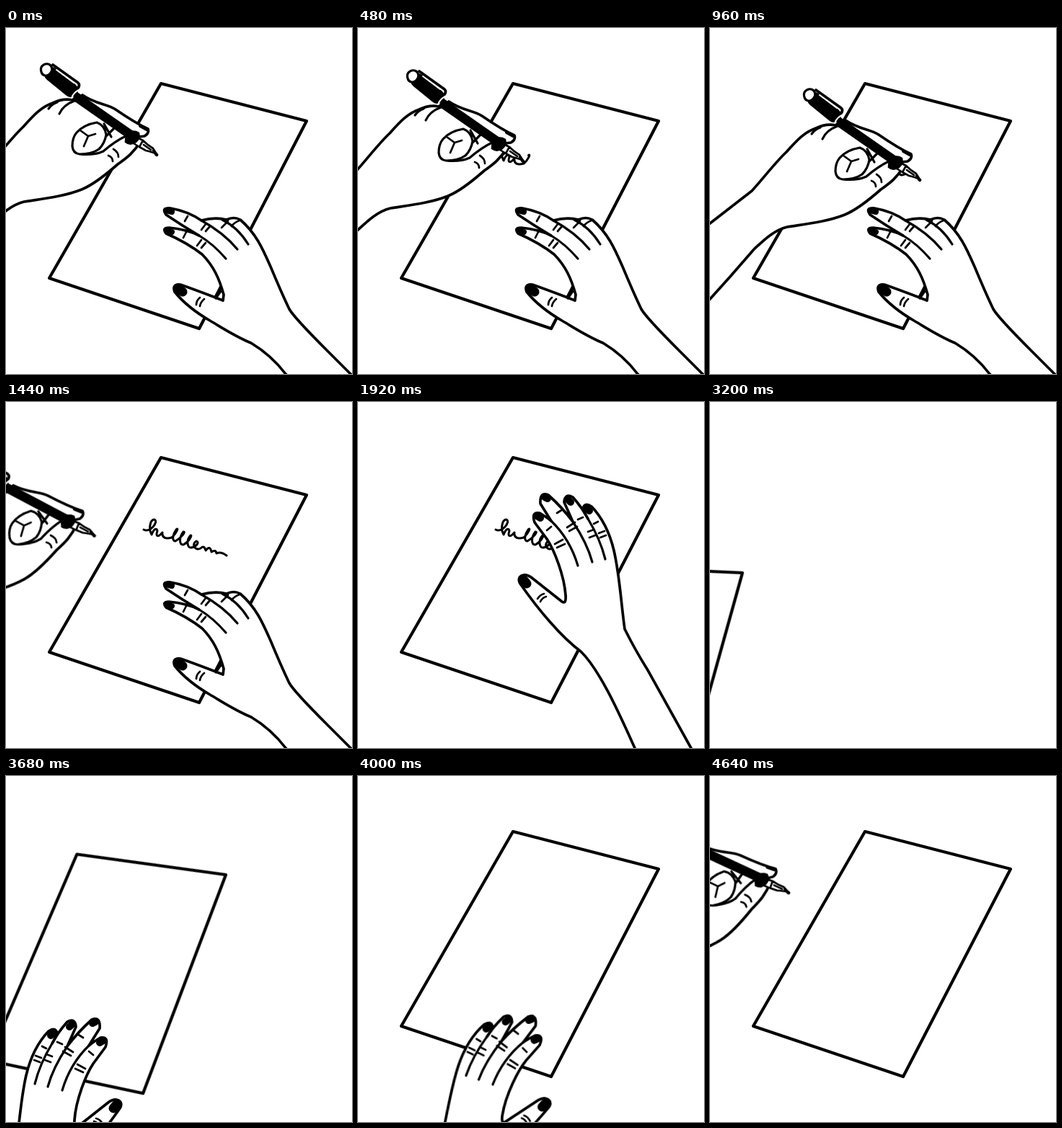
Recreate the animation shown at these times as an HTML page without scripts. Size 480x480 px, loop 4.8 s.

```html
<!DOCTYPE html>
<html lang="en">
<head>
<meta charset="utf-8">
<title>Writing and starting over</title>
<style>
html, body { margin: 0; width: 100%; height: 100%; overflow: hidden; background: #fff; }
svg { display: block; width: 100vw; height: 100vh; }
path { fill: none; stroke: #000; stroke-width: 2.7; stroke-linecap: round; stroke-linejoin: round; }
.skin { fill: #fff; stroke-width: 3.7; }
.line { stroke-width: 3.2; }
.paper { fill: #fff; stroke-width: 4.2; }
.nail { stroke-width: 10; }
.thumb { stroke-width: 13; }

/* 30 poses of 160 ms; steps() holds each pose */
.anim { animation: 4.8s step-end -1ms infinite; }
#sheet { animation-name: sheet; transform-origin: 417px 129px; }
#ink { animation-name: ink; stroke-width: 3; stroke-dasharray: 1 2; }
#rest { animation-name: rest; }
#pen { animation-name: pen; transform-origin: 210px 176px; }
#fold1 { animation-name: fold1; }
#fold2 { animation-name: fold2; }
#ball { animation-name: ball; }
#reach { animation-name: reach; transform-origin: 420px 480px; }
#throw { animation-name: throw; transform-origin: 450px 600px; }
#bring { animation-name: bring; transform-origin: 100px 400px; }

@keyframes sheet {
  0% { transform: none; opacity: 1; }
  46.666% { transform: none; opacity: 0; }
  63.333% { transform: translate(-470px, 146px) rotate(-13.5deg); opacity: 1; }
  66.666% { transform: translate(-372px, 108px) rotate(-11.8deg); opacity: 1; animation-timing-function: steps(3); }
  76.666% { transform: translate(-112px, 8px) rotate(-6.6deg); opacity: 1; animation-timing-function: steps(2); }
  83.333%, 100% { transform: translate(0, 0) rotate(0deg); opacity: 1; }
}
@keyframes ink {
  0% { stroke-dashoffset: 1.05; opacity: 0; }
  3.333% { stroke-dashoffset: .92; opacity: 1; animation-timing-function: steps(6); }
  23.333% { stroke-dashoffset: 0; opacity: 1; }
  46.666%, 100% { stroke-dashoffset: 0; opacity: 0; }
}
@keyframes pen {
  0% { transform: none; }
  3.333% { transform: translate(-14px, 2px); }
  6.666% { transform: translate(2px, 8px); }
  10% { transform: translate(20px, 9px); }
  13.333% { transform: translate(38px, 17px); }
  16.666% { transform: translate(60px, 25px); }
  20% { transform: translate(82px, 35px); }
  23.333% { transform: translate(97px, 39px) rotate(0deg); animation-timing-function: steps(4); }
  36.666% { transform: translate(-270px, -20px) rotate(-14deg); }
  96.666% { transform: translate(-100px, -14px) rotate(-10deg); }
  100% { transform: none; }
}
@keyframes rest { 0% { opacity: 1; } 33.333%, 100% { opacity: 0; } }
@keyframes reach {
  0% { opacity: 0; transform: none; }
  33.333% { opacity: 1; transform: translate(4px, 50px) rotate(-6deg); }
  36.666% { opacity: 1; transform: translate(2px, 18px) rotate(-2deg); }
  40% { opacity: 1; transform: none; }
  43.333% { opacity: 1; transform: translate(3px, -3px) rotate(1deg); }
  46.666% { opacity: 1; transform: translate(4px, -4px) rotate(3deg); }
  50%, 100% { opacity: 0; transform: none; }
}
@keyframes fold1 { 0% { opacity: 0; } 46.666% { opacity: 1; } 50%, 100% { opacity: 0; } }
@keyframes fold2 { 0% { opacity: 0; } 50% { opacity: 1; } 53.333%, 100% { opacity: 0; } }
@keyframes ball { 0% { opacity: 0; } 53.333%, 100% { opacity: 1; } }
@keyframes throw {
  0% { opacity: 0; transform: none; }
  50% { opacity: 1; transform: translate(-5px, 6px); }
  53.333% { opacity: 1; transform: none; }
  56.666% { opacity: 1; transform: translate(20px, -25px) rotate(6deg); }
  60% { opacity: 1; transform: translate(110px, -90px) rotate(20deg); }
  63.333%, 100% { opacity: 0; transform: none; }
}
@keyframes bring {
  0% { opacity: 0; transform: none; }
  66.666% { opacity: 1; transform: translate(-260px, 100px) rotate(-4deg); animation-timing-function: steps(3); }
  76.666% { opacity: 1; transform: translate(0, 0) rotate(0deg); animation-timing-function: steps(2); }
  83.333% { opacity: 1; transform: translate(112px, -6px) rotate(5deg); }
  86.666% { opacity: 1; transform: translate(30px, 95px) rotate(0deg); }
  90%, 100% { opacity: 0; transform: none; }
}
</style>
</head>
<body>
<svg viewBox="0 0 480 480">
  <defs>
    <g id="open">
      <path class="skin" d="M490 680 L384 480 C364 436 336 372 309 346 C282 326 250 288 225 252 C219 242 230 236 240 243 L283 277 Q289 281 288 268 C286 240 272 205 262 190 L245 167 Q240 152 252 154 Q262 160 268 165 L253 141 Q252 124 264 129 Q284 147 298 166 L286 139 Q287 126 298 132 Q312 148 319 162 L312 150 Q313 138 324 145 Q346 168 355 206 C363 240 365 280 370 315 Q385 345 402 372 L462 480 L600 730 Z"/>
      <path class="line" d="M268 165 Q294 190 305 227 M298 166 Q318 196 325 222 M319 162 Q336 190 343 218"/>
      <path d="M262 178 L268 173 M273 197 L284 191 M276 202 L287 197 M276 154 L284 149 M290 174 L301 167 M293 179 L304 173 M305 163 L312 160 M319 180 L327 177 M321 188 L329 185 M327 169 L333 166 M334 182 L342 179 M336 188 L344 185 M249 273 Q253 267 258 266 M253 277 Q256 271 261 270"/>
      <path class="nail" d="M248 158 L253 161 M259 132 L263 134 M291 135 L295 139 M316 147 L321 151"/>
      <path class="nail thumb" d="M230 247 L234 252"/>
    </g>
  </defs>

  <g id="sheet" class="anim">
    <path class="paper" d="M215 77 L417 129 L268 417 L60 347 Z"/>
  </g>
  <path id="ink" class="anim" pathLength="1" d="M191 177 C200 182 212 166 206 163 C199 163 198 178 202 184 C205 176 209 174 210 179 C207 187 211 188 217 181 C216 189 222 190 230 188 C237 182 240 173 236 177 C231 184 230 193 235 193 C244 188 250 179 246 180 C240 188 240 198 246 198 C254 194 259 184 256 185 C250 191 251 203 257 202 C264 201 269 194 264 193 C257 197 262 207 270 203 Q275 198 277 206 Q283 198 285 208 Q291 204 292 210 Q298 207 306 213"/>

  <g id="fold1" class="anim" opacity="0">
    <path class="paper" d="M222 84 L296 87 L352 108 L414 126 L398 180 L372 214 L352 282 L300 300 L258 334 L206 304 L158 296 L182 226 L176 188 L204 142 Z"/>
    <path class="line" d="M206 304 L232 262 L228 230 M182 226 L212 212 M352 108 L346 128"/>
  </g>

  <g id="rest" class="anim">
    <path class="skin" d="M271 267 Q290 262 306 266 Q316 261 325 266 C347 285 356 306 367 331 Q382 367 393 390 C400 402 430 432 445 447 L479 481 L640 640 L540 640 L388 480 C375 463 360 449 340 437 C318 428 300 416 283 406 C264 395 246 381 234 366 Q230 355 242 356 Q265 364 301 378 L302 370 C296 348 288 330 272 314 C258 303 238 292 222 285 Q216 277 226 277 Q250 279 268 288 Q244 274 222 259 Q215 249 228 250 Q252 254 271 267 Z"/>
    <path class="line" d="M271 267 Q302 284 321 307 M268 288 Q288 300 305 320 M300 266 Q322 277 336 300 M298 365 L291 375"/>
    <path d="M252 261 L248 268 M277 272 L271 280 M283 275 L277 282 M250 283 L246 291 M271 294 L265 302 M277 298 L271 305 M308 268 L299 277 M324 267 Q316 270 313 275 M269 374 Q264 378 264 384 M275 376 Q270 380 269 386"/>
    <path class="nail" style="stroke-width:8" d="M222 253 L230 255 M223 281 L230 283"/>
    <path class="nail thumb" d="M238 361 L245 366"/>
  </g>

  <g id="pen" class="anim">
    <path class="skin" d="M-250 374 L-82 236 L-24 191 C-10 176 8 152 24 137 C40 119 50 109 65 104 Q80 96 99 101 L106 93 C125 106 140 105 152 113 C168 124 182 133 197 140 Q199 146 192 150 L184 151 L186 158 C178 172 168 180 155 189 C138 204 122 217 105 224 C80 234 50 237 25 241 C5 246 -10 262 -21 272 L-55 311 L-82 341 L-220 500 Z"/>
    <path class="line" d="M92 164 Q92 152 98 145 Q108 134 126 131 Q137 135 139 148 Q137 160 129 168 Q119 175 102 175 Q93 174 92 164 M168 149 Q151 157 135 171 Q122 177 102 175 M59 112 Q63 106 71 103 M74 119 Q79 107 95 101 M136 133 L146 151 M151 138 L140 149"/>
    <path d="M103 142 L114 150 L108 164 M114 150 L124 147 M142 177 Q148 179 148 185 M149 168 Q156 172 156 179"/>
    <path style="stroke-width:13;stroke-linecap:butt" d="M95 94 L174 149"/>
    <path style="stroke-width:4" d="M186 136 L195 141"/>
    <path style="stroke-width:20" d="M63 64 L90 86"/>
    <path style="stroke-width:3.8" d="M65 51 L100 76 Q103 79 100 83"/>
    <path style="stroke:#fff;stroke-width:2" d="M101 86 Q94 89 91 97 M70 58 L94 76"/>
    <path class="skin" style="stroke-width:3.2" d="M49 61 C46 51 57 47 62 52 C67 59 60 67 54 66 Q50 65 49 61 Z"/>
    <path class="skin" style="stroke-width:2.6" d="M182 152 L190 156 L185 165 L177 160 Z M190 156 Q197 163 204 167 L209 175 Q200 171 194 170 L185 165 Z"/>
    <path d="M191 162 L201 169 M204 170 L210 176"/>
    <path style="stroke-width:4.5" d="M208 175 L209 176"/>
    <path style="fill:#000" d="M167 147 Q176 141 184 146 Q186 153 180 158 Q172 163 166 158 Z"/>
  </g>

  <g id="reach" class="anim" opacity="0"><use href="#open"/></g>

  <g id="throw" class="anim" opacity="0">
    <g id="fold2" class="anim">
      <path class="paper" d="M246 80 L278 72 L322 82 L364 72 L394 98 L424 118 L408 160 L392 212 L350 236 L296 220 L250 228 L240 180 L228 140 Z"/>
      <path class="line" d="M322 82 L338 104 M394 98 L386 122 M240 180 L262 172"/>
    </g>
    <g id="ball" class="anim">
      <path class="skin" d="M268 71 Q276 66 290 73 Q308 67 331 74 Q341 58 354 52 Q370 60 386 73 L395 91 Q408 90 412 95 L417 107 L427 119 Q416 132 416 142 L414 155 L396 168 L378 185 L330 200 L283 186 L272 186 L266 148 L254 130 Q259 98 268 71 Z"/>
      <path class="line" d="M331 74 L350 83 M353 74 L363 84 M395 91 L398 104 M394 146 L416 142 M280 102 L287 114 M345 109 Q356 120 361 131 M318 126 L325 129 M340 136 L357 145 M266 148 L278 155"/>
    </g>
    <path class="skin" d="M455 700 L376 480 C358 428 340 360 320 331 C292 311 268 280 241 237 C236 225 247 218 256 226 Q274 241 295 266 Q300 269 300 258 C301 230 293 196 283 172 L269 148 Q268 136 278 139 Q289 148 297 158 L282 126 Q281 112 293 116 Q316 142 328 174 L325 124 Q326 114 336 117 C344 135 350 162 354 192 Q358 166 362 139 Q363 130 371 133 C377 155 376 190 376 215 C377 245 377 285 386 320 Q397 349 410 379 L451 480 L550 724 Z"/>
    <path class="line" d="M297 158 Q314 178 323 217 M328 174 Q336 192 341 214 M354 192 L357 213"/>
    <path d="M285 163 L295 158 M298 181 L309 178 M300 186 L312 183 M303 148 L311 144 M315 167 L325 163 M317 172 L326 168 M334 148 L343 145 M338 170 L348 167 M339 177 L349 174 M361 159 L370 157 M359 178 L372 179 M370 184 L375 184 M262 256 Q267 251 273 251 M264 261 Q269 256 274 256"/>
    <path class="nail" d="M274 143 L279 147 M287 118 L291 122 M331 120 L333 125 M368 137 L368 142"/>
    <path class="nail thumb" d="M245 229 L249 234"/>
  </g>

  <g id="bring" class="anim" opacity="0"><use href="#open" transform="translate(383 209) scale(-1 1)"/></g>
</svg>
</body>
</html>
```
